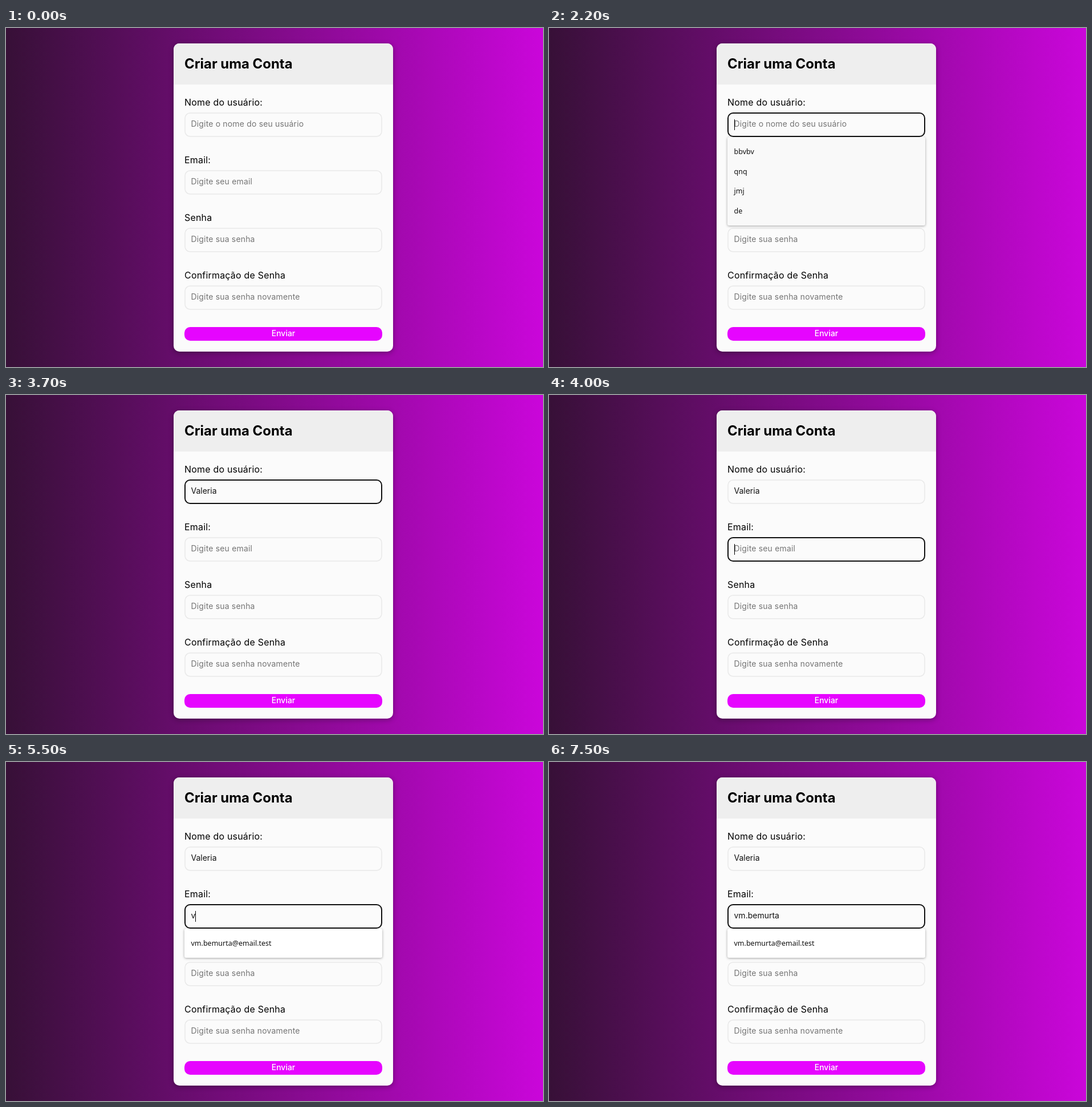
Animation of 942x594 px, one loop 8 s. Source, as an HTML page:

```html
<!DOCTYPE html>
<html lang="pt-BR">
<head>
<meta charset="utf-8">
<title>Criar uma Conta</title>
<style>
  html, body { margin: 0; width: 100%; height: 100%; overflow: hidden; }
  body { background: linear-gradient(90deg, #371037, #ca06da); }
  svg { display: block; width: 942px; height: 594px; font-family: Inter, sans-serif; }
  .card { fill: #fbfbfb; filter: drop-shadow(0 2px 4px rgba(0, 0, 0, .35)); }
  .title { font-size: 24px; font-weight: 700; letter-spacing: -.002em; }
  .label { font-size: 16px; letter-spacing: .012em; }
  .value, .hint { font-size: 14px; }
  .value { fill: #111; }
  .hint { fill: #757575; letter-spacing: .012em; }
  .box { fill: #fbfbfb; stroke: #e9e9e9; stroke-width: 1.5px; }
  .box.focus { stroke: #101010; stroke-width: 2px; }
  .menu rect { filter: drop-shadow(0 1px 2px rgba(0, 0, 0, .35)); }
  .menu text { font: 12.5px "Noto Sans", sans-serif; fill: #111; }
  .send { font-size: 14px; font-weight: 500; fill: #fff; text-anchor: middle; }
</style>
</head>
<body>
<svg id="stage" viewBox="0 0 942 594">
  <rect class="card" x="294" y="27" width="385" height="540" rx="10"/>
  <path d="M294 99V37a10 10 0 0 1 10-10H669a10 10 0 0 1 10 10V99Z" fill="#eee"/>
  <text class="title" x="313" y="71">Criar uma Conta</text>
  <rect x="313" y="524" width="347" height="24" rx="10" fill="#e605ff"/>
  <text class="send" x="486.5" y="540">Enviar</text>
</svg>
<script>
const stage = document.getElementById('stage');
const LOOP = 8000;

function add(parent, tag, attrs, text = '') {
  const el = document.createElementNS('http://www.w3.org/2000/svg', tag);
  for (const key in attrs) el.setAttribute(key, attrs[key]);
  el.textContent = text;
  return parent.appendChild(el);
}

function addField(y, label, hint) {
  add(stage, 'text', { class: 'label', x: 313, y: y - 12 }, label);
  return {
    y,
    box: add(stage, 'rect', { class: 'box', x: 314, y: y + 1, width: 345, height: 41, rx: 9 }),
    hint: add(stage, 'text', { class: 'hint', x: 324.5, y: y + 25 }, hint),
    value: add(stage, 'text', { class: 'value', x: 324.5, y: y + 25 })
  };
}

function addMenu(y, height, fill, items) {
  const menu = add(stage, 'g', { class: 'menu' });
  add(menu, 'rect', { x: 313, y, width: 347, height, rx: 3, fill });
  items.forEach((item, i) =>
    add(menu, 'text', { x: 324.5, y: y + 30 + i * 34.7 }, item));
  return menu;
}

const fields = [
  addField(148, 'Nome do usuário:', 'Digite o nome do seu usuário'),
  addField(249, 'Email:', 'Digite seu email'),
  addField(350, 'Senha', 'Digite sua senha'),
  addField(451, 'Confirmação de Senha', 'Digite sua senha novamente')
];
const menus = [
  addMenu(191, 155, '#f9f9f9', ['bbvbv', 'qnq', 'jmj', 'de']),
  addMenu(292, 51, '#fff', ['vm.bemurta@email.test'])
];
const caret = add(stage, 'rect', { width: 1, height: 19, fill: '#000' });

const NAME = 'Valeria', USER = 'vm.bemurta';
// Moments at which each further character is present
const nameKeys = [2300, 2400, 2500, 2700, 3000, 3100, 3300];
const userKeys = [5500, 6000, 6300, 6400, 6500, 6700, 6800, 6900, 7000, 7000];
const caretSpans = [
  [1300, 1700], [2200, 3700], [4000, 4500], [4900, 5400],
  [5500, 5900], [6000, 7500]
];

const within = (t, from, to) => t >= from && t < to;
const typed = (text, keys, t) => text.slice(0, keys.filter(k => k <= t).length);
const show = (el, on) => el.setAttribute('visibility', on ? 'visible' : 'hidden');

function draw(t) {
  const active = t < 1300 ? -1 : t < 4000 ? 0 : 1;
  const values = [typed(NAME, nameKeys, t), typed(USER, userKeys, t), '', ''];

  fields.forEach((f, i) => {
    f.box.classList.toggle('focus', i === active);
    f.value.textContent = values[i];
    show(f.hint, !values[i]);
  });
  show(menus[0], within(t, 1300, 2300));
  show(menus[1], t >= 5500);

  show(caret, caretSpans.some(([from, to]) => within(t, from, to)));
  if (active >= 0) {
    const f = fields[active];
    const w = values[active] ? f.value.getComputedTextLength() : 0;
    caret.setAttribute('x', Math.round(324.6 + w));
    caret.setAttribute('y', f.y + 12);
  }
}

const start = performance.now();
function tick() {
  draw((performance.now() - start) % LOOP);
  requestAnimationFrame(tick);
}
tick();
</script>
</body>
</html>
```
